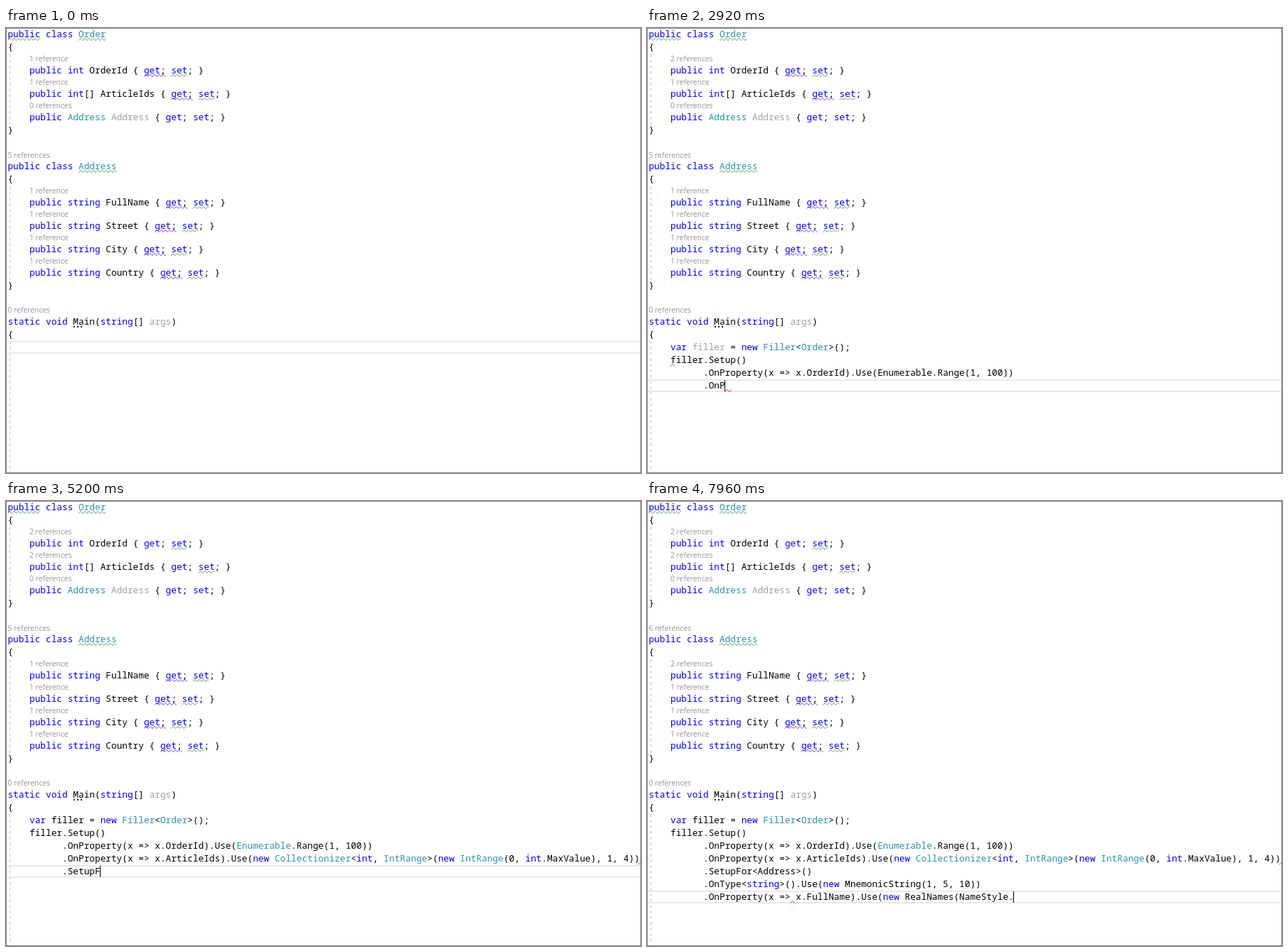
Write an HTML page with a canvas that moves like this. It is 893 by 627 pixels and loops after 8000 ms.

```html
<!DOCTYPE html>
<html lang="en">
<head>
<meta charset="utf-8">
<title>Typing in a code editor</title>
<style>
html, body { margin: 0; width: 100%; height: 100%; overflow: hidden; background: #fff; }
canvas { display: block; width: 893px; height: 627px; }
</style>
</head>
<body>
<canvas id="stage" width="893" height="627"></canvas>
<script>
const ctx = document.getElementById("stage").getContext("2d");
const W = 893, H = 627, LOOP = 8000, STEP = 40;
const SIZE = 12.77, CHAR = SIZE * 0.6, LEFT = 2.4;
const CODE_FONT = SIZE + 'px "Noto Sans Mono", monospace';
const LENS_FONT = '10.35px "Open Sans", sans-serif';
const COLORS = { k: "#000", b: "#0000ff", t: "#2b91af", g: "#a0a0a0" };
const GREEN = "#4a9e4a", PURPLE = "#6430ff", RED = "#f02020";
const PARSED = 4880;

const colX = col => LEFT + col * CHAR;

// Markup alternates a colour key and its text: "b~int~k~ x"
function code(y, col, markup, limit = Infinity) {
  const parts = markup.split("~");
  ctx.font = CODE_FONT;
  for (let i = 0; i < parts.length && limit > 0; i += 2) {
    const text = parts[i + 1].slice(0, limit);
    ctx.fillStyle = COLORS[parts[i]];
    ctx.fillText(text, colX(col), y);
    col += text.length;
    limit -= text.length;
  }
}

function lens(y, x, count) {
  ctx.font = LENS_FONT;
  ctx.fillStyle = "#949494";
  ctx.fillText(count + (count === 1 ? " reference" : " references"), x, y);
}

function squiggle(x, y, width, color) {
  ctx.beginPath();
  for (let d = 0; d <= width; d += 0.5) {
    const py = y + 3 + 1.3 * Math.cos(d * Math.PI / 3);
    d ? ctx.lineTo(x + d, py) : ctx.moveTo(x, py);
  }
  ctx.strokeStyle = color;
  ctx.lineWidth = 1;
  ctx.stroke();
}

const underline = (y, col, chars, color) => squiggle(colX(col), y, chars * CHAR, color);

function guide(top, bottom) {
  ctx.beginPath();
  ctx.setLineDash([4, 4]);
  ctx.moveTo(5.5, top);
  ctx.lineTo(5.5, bottom);
  ctx.strokeStyle = "#c0c0c0";
  ctx.lineWidth = 1;
  ctx.stroke();
  ctx.setLineDash([]);
}

function property(y, type, name, count, getMark = true) {
  lens(y - 17, 33, count);
  code(y, 4, `b~public ${type}~k~ ${name} { ~b~get~k~; ~b~set~k~; }`);
  const col = 4 + 7 + type.length + 1 + name.length + 3;
  if (getMark) underline(y, col, 4, PURPLE);
  underline(y, col + 5, 3, GREEN);
}

// Reference counters are blank for a moment while they refresh
const REFRESH = [560, 1640, 2400, 3240, 4080, 4920, 5800, 6640, 7480];
function counter(t, delay, before, changeAt = Infinity) {
  const busy = REFRESH.some(s => t >= s + delay && t < s + delay + 80);
  return busy ? "–" : t >= changeAt ? before + 1 : before;
}

function drawClasses(t) {
  const getMark = t < PARSED;
  code(13, 0, "b~public class ~t~Order");
  underline(13, 0, 6, GREEN);
  underline(13, 13, 5, GREEN);
  code(31, 0, "k~{");
  property(64, "int", "OrderId", counter(t, 0, 1, 2400), getMark);
  property(97, "int[]", "ArticleIds", counter(t, 80, 1, 4160), getMark);
  // Brackets of the array type are black
  ctx.fillStyle = "#fff";
  ctx.fillRect(colX(14), 86, 2 * CHAR, 14);
  code(97, 14, "k~[]");
  lens(113, 33, 0);
  code(130, 4, "b~public ~t~Address~g~ Address~k~ { ~b~get~k~; ~b~set~k~; }");
  code(148, 0, "k~}");

  lens(183, 2.5, t >= 5880 ? 6 : 5);
  code(199, 0, "b~public class ~t~Address");
  underline(199, 13, 7, GREEN);
  code(217, 0, "k~{");
  property(250, "string", "FullName", t >= 7560 ? 2 : 1);
  property(283, "string", "Street", 1);
  property(316, "string", "City", counter(t, 80, 1));
  property(349, "string", "Country", 1);
  code(367, 0, "k~}");

  lens(401, 2.5, 0);
  code(418, 0, "b~static void ~k~Main(~b~string~k~[] ~g~args~k~)");
  ctx.fillStyle = "#222";
  for (let i = 0; i < 3; i++) ctx.fillRect(95 + i * 5, 420, 2, 2);
  code(436, 0, "k~{");

  guide(37, 136);
  guide(223, 355);
  guide(441, 626);
}

function typedLines(t) {
  const kw = at => t >= at ? "b" : "k";
  const type = t >= 1400 ? "t" : "k";
  const late = t >= PARSED ? "t" : "k";
  const lateKw = kw(PARSED);
  const unused = t >= 1400 && t < PARSED ? "g" : "k";
  const tail = t < 6600 ? "b" : "k";
  return [
    `${kw(520)}~var ~${unused}~filler~k~ = ~${kw(920)}~new ~${type}~Filler~k~<~${type}~Order~k~>();`,
    "k~filler.Setup()",
    `k~.OnProperty(x => x.OrderId).Use(~${late}~Enumerable~k~.Range(1, 100))`,
    `k~.OnProperty(x => x.ArticleIds).Use(~${lateKw}~new ~${late}~Collectionizer~k~<~${lateKw}~int~k~, ` +
      `~${late}~IntRange~k~>(~${lateKw}~new ~${late}~IntRange~k~(0, ~${lateKw}~int~k~.MaxValue), 1, 4))`,
    "k~.SetupFor<Address>()",
    `k~.OnType<~b~string~${tail}~>().Use(~b~new ~${tail}~MnemonicString(1, 5, 10))`,
    `k~.OnProperty(x => x.FullName).Use(~${kw(7640)}~new ~k~RealNames(NameStyle.`
  ];
}

const plainLength = markup =>
  markup.split("~").reduce((sum, part, i) => sum + (i % 2 ? part.length : 0), 0);

// Pairs of time and keys pressed
const KEYS = [
  [0, 0], [160, 0], [200, 1], [320, 2], [440, 2], [1160, 34], [1320, 34], [1720, 52],
  [2160, 74], [2800, 106], [2840, 107], [2920, 111], [3720, 152], [3840, 159],
  [4680, 201], [5200, 221], [5520, 235], [5560, 235], [6160, 257], [6400, 269],
  [7240, 310], [7960, 344]
];

function keysAt(t) {
  const i = KEYS.findIndex(key => key[0] > t);
  if (i < 0) return KEYS[KEYS.length - 1][1];
  const [t0, n0] = KEYS[i - 1], [t1, n1] = KEYS[i];
  return Math.floor(n0 + (n1 - n0) * (t - t0) / (t1 - t0) + 1e-6);
}

function drawTyping(t) {
  const lines = typedLines(t);
  const indent = i => i < 2 ? 4 : 10;
  const base = i => 454 + i * 18;
  let row = 0, left = keysAt(t);
  while (row < lines.length - 1 && left > plainLength(lines[row])) {
    left -= plainLength(lines[row++]) + 1;
  }

  const top = 441 + row * 18;
  ctx.fillStyle = row ? "#e8e8f2" : "#eaeaec";
  ctx.fillRect(1, top, W - 2, 2);
  ctx.fillRect(1, top + 16, W - 2, 2);

  for (let i = 0; i <= row; i++) {
    code(base(i), indent(i), lines[i], i < row ? Infinity : left);
  }

  const caretX = colX(indent(row) + left);
  if (t >= 1400 && t < PARSED) squiggle(colX(4), base(1), 6, RED);
  if (t >= 1360 && t < 4720) squiggle(caretX, base(row), 9.5, RED);
  if (t >= PARSED) squiggle(889, base(3), 3, RED);
  if (t >= 7300) squiggle(colX(26), base(6), 6.5, RED);

  if (t >= 200) {
    ctx.fillStyle = "#000";
    ctx.fillRect(Math.floor(caretX), top + 1, 1, 16);
  }
}

function draw(now) {
  const t = Math.floor((now % LOOP) / STEP) * STEP;
  ctx.fillStyle = "#fff";
  ctx.fillRect(0, 0, W, H);
  drawClasses(t);
  drawTyping(t);
  ctx.strokeStyle = "#868686";
  ctx.lineWidth = 1;
  ctx.strokeRect(0.5, 0.5, W - 1, H - 1);
}

const start = performance.now();
function frame() {
  draw(performance.now() - start);
  requestAnimationFrame(frame);
}
frame();
</script>
</body>
</html>
```
